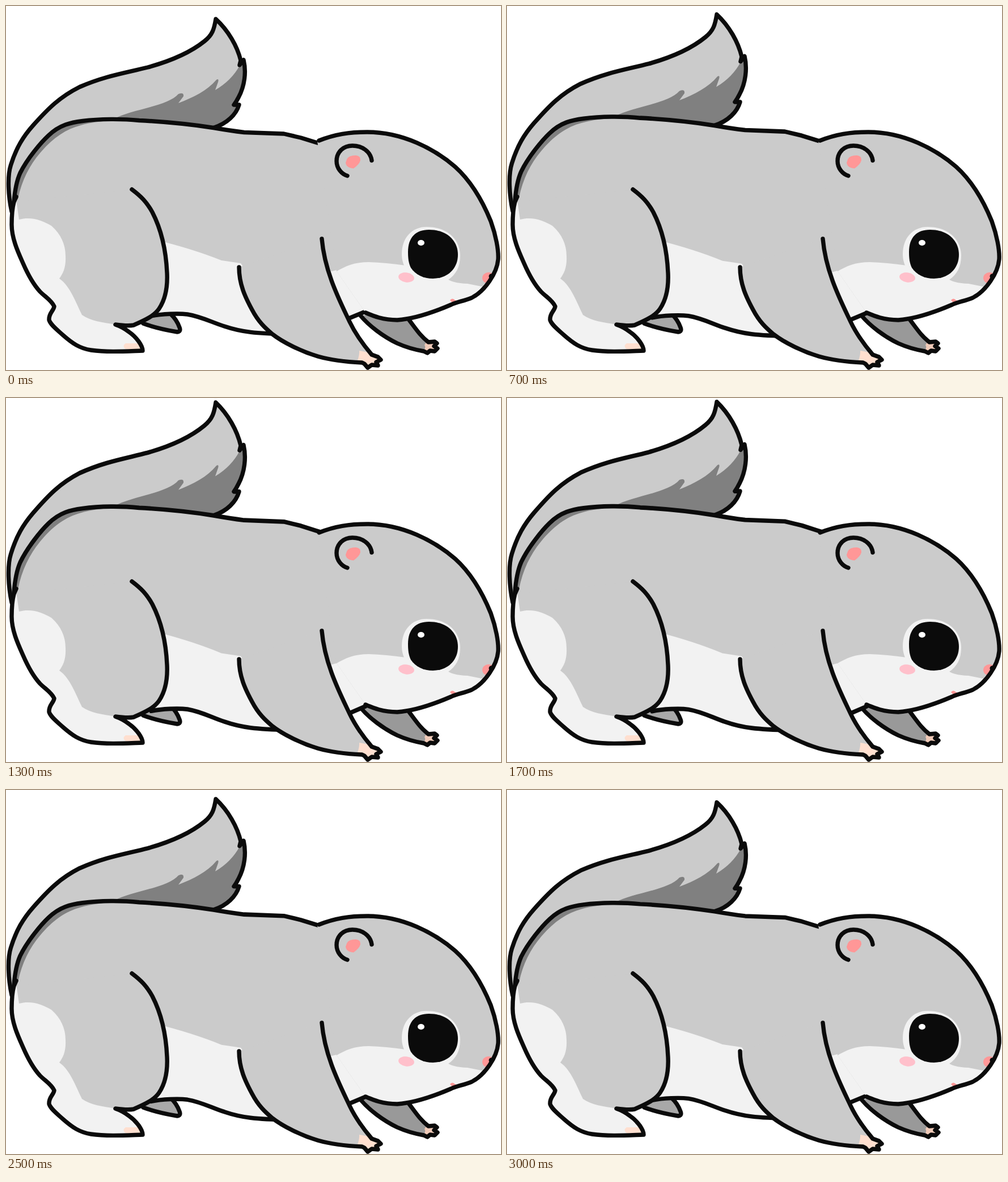
An HTML page that plays this animation: 873x641 px, repeating every 3100 ms.

```html
<!DOCTYPE html>
<html lang="en">
<head>
<meta charset="utf-8">
<title>Breathing squirrel</title>
<style>
  html, body { margin: 0; width: 100%; height: 100%; overflow: hidden; background: #fff; }
  svg { display: block; }
  .line { fill: none; stroke: #0b0b0b; stroke-width: 7.4; stroke-linecap: round; stroke-linejoin: round; }
  .fur { fill: #cbcbcb; }
  .pale { fill: #f2f2f2; }
  .dark { fill: #808080; }
  .skin { fill: #ffdfcf; }
  .pink { fill: #ff9797; }
</style>
</head>
<body>
<svg width="873" height="641" viewBox="0 0 873 641">
  <defs>
    <path id="tail" d="M10 362C4 335 2 300 8.500 280C18 250 30 230 48 210C75 180 95 160 130 142.500C175 123 210 118 250 108C290 97 325 82 350 62C364 51 367 41 370 23C392 43 408 71 414 96L412 104L419 95C424 116 421 141 410 161Q406 169 402 174L411 174C406 191 390 207 366 214.500"/>
    <path id="body" d="M14 345C16 320 20 305 25 294C38 268 62 240 75 228C95 209 115 205 135 202.500C165 198.500 205 198.500 235 201.500C285 204 330 209 366 214.500Q395 219.500 420 222.500L490 225L520 232L546 240L570 247L640 400L640 536L605 550L500 578C440 577 415 574 385 564C365 558 345 547 320 543C305 541 275 542 256 546Z"/>
    <path id="head" d="M549 238L552 237C580 226 605 222 637 222C700 222 756 252 792 283C822 310 842 347 855 379C864 404 869 430 868 446C866 470 845 502 821 514C806 520 795 521 785 526C750 541 720 551 690 553C665 553 648 546 634 540L583 467Z"/>
    <path id="arm" d="M411 460C411 490 422 513 434 535C445 556 457 567 470 578C488 592 520 608 550 617C578 625 605 627 628 628L632 630L638 637L645 632L656 633L653 627L661 623L656 618L645 614C628 594 616 577 606 556C588 518 562 468 557 410Z"/>
    <path id="leg" d="M14 345Q10 360 10 385C10 410 22 435 30 453C40 476 48 490 60 503C70 513 80 518 85 529C84 537 75 541 76 553C79 562 90 570 101 580C117 594 130 603 150 606C180 610 210 608 241 607C241 598 230 583 217 574Q205 565 193 561Q215 564 225 562C248 552 262 545 270 533C282 515 285 490 284 470C282 425 272 390 258 363C248 345 238 335 222 323Z"/>
    <path id="farArm" d="M625 545C640 563 665 582 690 594C710 603 725 606 737 608L743 611L748 607L756 608L761 603L755 599L760 594L756 591L745 592C730 580 724 570 711 553L680 540Z"/>
    <clipPath id="inBody"><use href="#body"/></clipPath>
    <clipPath id="inHead"><use href="#head"/></clipPath>
    <clipPath id="inArm"><use href="#arm"/></clipPath>
    <clipPath id="inLeg"><use href="#leg"/></clipPath>
    <clipPath id="inFarArm"><use href="#farArm"/></clipPath>
  </defs>

  <!-- far limbs -->
  <path fill="#a8a8a8" d="M242 559Q266 568 302 574Q309 573 306 566Q301 552 290 542L256 544Z"/>
  <path class="line" d="M242 559Q266 568 302 574Q309 573 306 566Q301 552 290 542"/>
  <use href="#farArm" fill="#999"/>
  <path clip-path="url(#inFarArm)" fill="#f0cab8" d="M744 588L770 588L770 614L733 612Q742 602 738 597Z"/>
  <path class="line" d="M625 545C640 563 665 582 690 594C710 603 725 606 737 608L743 611L748 607L756 608L761 603L755 599L760 594L756 591L745 592C730 580 724 570 711 553"/>

  <!-- tail and trunk -->
  <g id="breath">
    <use href="#tail" class="fur"/>
    <path class="dark" d="M190 199C220 182 285 177 304 155Q314 151 313 159L304 171C330 161 355 149 371 130Q376 127 374 134L369 148Q398 131 412 105L419 95C424 116 421 141 410 161L402 174L411 174C406 191 390 207 366 214Z"/>
    <use href="#tail" class="line"/>
    <use href="#body" class="fur"/>
    <g clip-path="url(#inBody)">
      <path class="dark" d="M200 190L200 201Q155 203 132 210C105 217 82 233 60 259C42 280 28 306 21 340L0 350L20 200Z"/>
      <path class="pale" d="M265 412Q330 428 380 448L414 453L520 600L200 600Z"/>
      <path class="pale" d="M550 470L575 467Q600 461 640 450L640 560L580 570Z"/>
    </g>
    <path class="line" d="M14 345C16 320 20 305 25 294C38 268 62 240 75 228C95 209 115 205 135 202.500C165 198.500 205 198.500 235 201.500C285 204 330 209 366 214.500Q395 219.500 420 222.500L490 225L520 232L546 240L570 247"/>
    <path class="line" d="M256 546C275 542 305 541 320 543C345 547 365 558 385 564C415 574 440 577 500 578M600 552L634 538"/>
  </g>

  <!-- head -->
  <use href="#head" class="fur"/>
  <g clip-path="url(#inHead)">
    <path class="pale" d="M580 469C600 457 615 451 640 451Q670 452 705 457L776 479Q786 488 814 489L844 495L880 500L800 600L600 600Z"/>
    <path class="pale" d="M698 437C698 408 716 389 742 389C778 389 801 411 801 440C801 460 793 473 780 482L740 484C712 478 698 460 698 437Z"/>
    <ellipse class="pink" cx="851" cy="479" rx="11" ry="10"/>
    <ellipse cx="706" cy="478" rx="14" ry="8.5" fill="#ffc0cb" transform="rotate(8 706 478)"/>
    <path class="pink" d="M783 518Q787 513 792 518L800 521L789 524Z"/>
  </g>
  <path fill="#0b0b0b" d="M709 433C709 408 722 394 746 394C776 394 797 412 797 438C797 463 778 480 753 480C736 480 722 473 714 461C710 453 709 444 709 433Z"/>
  <ellipse cx="732" cy="417" rx="6" ry="5" fill="#fff"/>
  <path class="pink" d="M601 270Q604 263 617 263Q626 264 625 272Q623 279 613 286Q600 285 599 276Z"/>
  <path class="line" d="M602 299C592 296 583 286 583 273C583 257 595 246 611 246C629 246 643 257 645 272"/>
  <path class="line" d="M552 237C580 226 605 222 637 222C700 222 756 252 792 283C822 310 842 347 855 379C864 404 869 430 868 446C866 470 845 502 821 514C806 520 795 521 785 526C750 541 720 551 690 553C665 553 648 546 634 540"/>
  <circle cx="856" cy="476" r="4.5" fill="#0b0b0b"/>

  <!-- near arm -->
  <use href="#arm" class="fur"/>
  <path clip-path="url(#inArm)" class="skin" d="M623 607L650 612L670 612L670 640L617 632Q624 616 623 607Z"/>
  <path class="line" d="M411 460C411 490 422 513 434 535C445 556 457 567 470 578C488 592 520 608 550 617C578 625 605 627 628 628L632 630L638 637L645 632L656 633L653 627L661 623L656 618L645 614C628 594 616 577 606 556C588 518 562 468 557 410"/>

  <!-- near leg -->
  <use href="#leg" class="fur"/>
  <g clip-path="url(#inLeg)">
    <path class="pale" d="M17 335L23 376C45 370 65 378 80 387C97 402 105 420 105 440C106 460 101 470 94 480C113 493 122 520 134 544C150 555 170 557 193 561L260 580L260 620L0 620L0 335Z"/>
    <path class="skin" d="M211 594L245 594L245 604L211 604Q204 599 211 594Z"/>
  </g>
  <path class="line" d="M18 336L14 345Q10 360 10 385C10 410 22 435 30 453C40 476 48 490 60 503C70 513 80 518 85 529C84 537 75 541 76 553C79 562 90 570 101 580C117 594 130 603 150 606C180 610 210 608 241 607C241 598 230 583 217 574Q205 565 193 561Q215 564 225 562C248 552 262 545 270 533C282 515 285 490 284 470C282 425 272 390 258 363C248 345 238 335 222 323"/>
</svg>
<script>
  const STEP = 100, STEPS = 31, PIVOT = 411, SWELL = 0.0446;
  const breath = document.getElementById('breath');
  const start = performance.now();

  // The trunk stretches vertically about PIVOT, in then out, in even steps.
  function draw(ms) {
    const n = Math.floor(ms / STEP) % STEPS;
    const scale = 1 + SWELL * Math.min(n, STEPS - n) / 15;
    breath.setAttribute('transform', `translate(0 ${PIVOT * (1 - scale)}) scale(1 ${scale})`);
  }

  function tick() {
    draw(performance.now() - start);
    requestAnimationFrame(tick);
  }
  tick();
</script>
</body>
</html>
```
